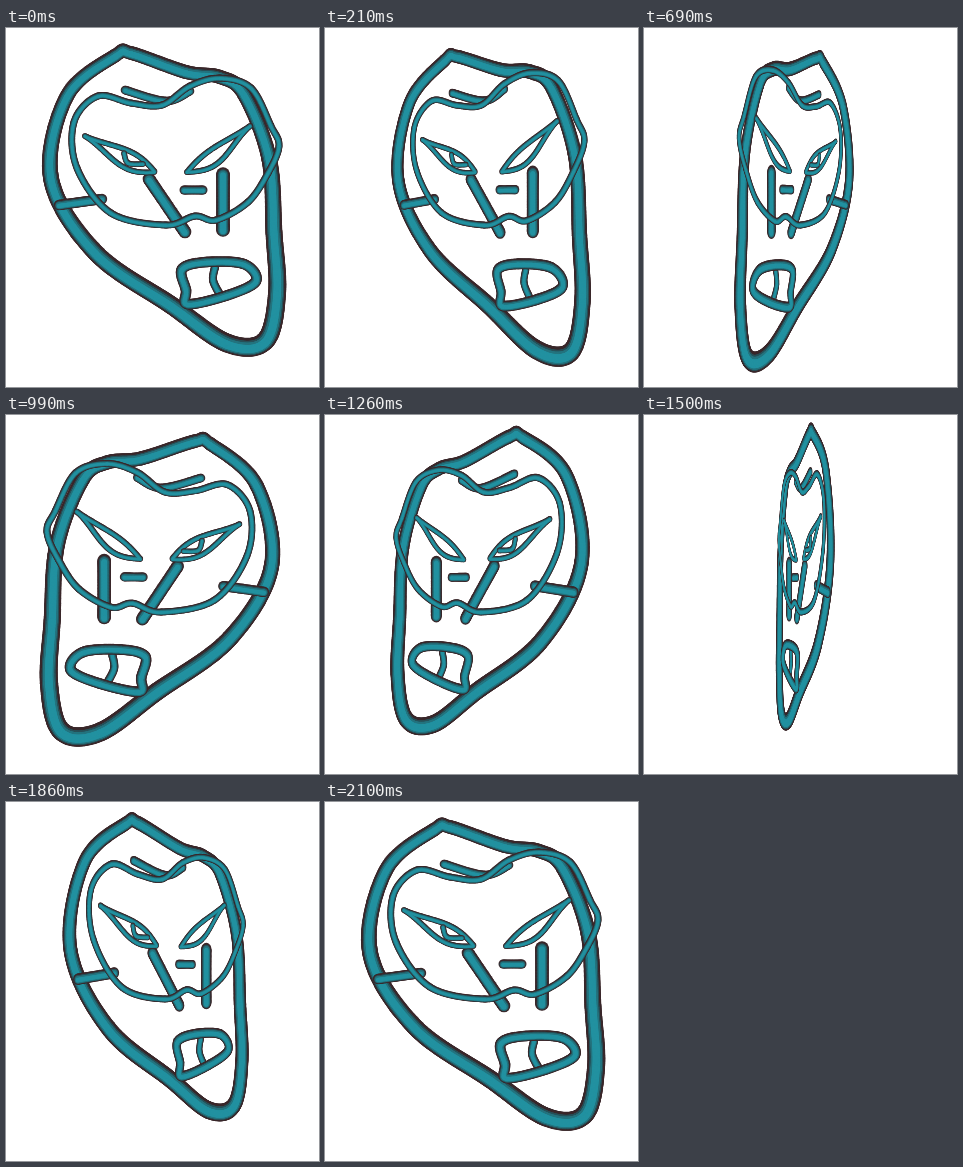
An HTML page with a canvas that plays this animation: 313 by 359 pixels, repeating every 2.16 s.

```html
<!DOCTYPE html>
<html lang="en">
<head>
<meta charset="utf-8">
<title>Turning mask</title>
<style>
  html, body { margin: 0; width: 313px; height: 359px; overflow: hidden; background: #fff; }
  canvas { display: block; }
</style>
</head>
<body>
<canvas id="stage" width="313" height="359"></canvas>
<script>
const ctx = document.getElementById('stage').getContext('2d');
const LOOP = 2160, STEP = 30, STEPS = 70;
const AXIS = 157.5, HORIZON = 175, CAMERA = 827;
const DEPTH = 0.36; // tube depth relative to its width
const CREST_DROP = 0.3; // the lit crest sits below the tube's middle

// Shading from rim to crest: colour and share of the tube radius
const SHADES = [['#3a282b', 1], ['#285058', 0.76], ['#24747f', 0.62], ['#2291a0', 0.42]];

const lerp = (a, b, u) => a + (b - a) * u;

// Catmull-Rom blend of four values
function spline(a, b, c, d, u) {
  const cubic = 3 * (b - c) + d - a;
  const square = 2 * a - 5 * b + 4 * c - d;
  return b + 0.5 * u * (c - a + u * (square + u * cubic));
}

// Smooth curve through key points, sampled about once per pixel
function curve(points, closed = false) {
  const n = points.length, samples = [];
  const at = i => points[closed ? (i + n) % n : Math.max(0, Math.min(n - 1, i))];
  for (let i = 0; i < (closed ? n : n - 1); i++) {
    const [a, b, c, d] = [at(i - 1), at(i), at(i + 1), at(i + 2)];
    const count = Math.ceil(Math.hypot(c[0] - b[0], c[1] - b[1]) / 1.2);
    for (let k = 0; k <= count; k++) {
      const u = k / count;
      samples.push([spline(a[0], b[0], c[0], d[0], u), spline(a[1], b[1], c[1], d[1], u)]);
    }
  }
  return samples;
}

// Eye outline between two corners, widest near the second one
function leaf([x1, y1], [x2, y2], above, below) {
  const length = Math.hypot(x2 - x1, y2 - y1), samples = [];
  const side = Math.sign(x2 - x1);
  for (const bulge of [-above * side, below * side]) {
    for (let k = 0; k <= length; k++) {
      const u = k / length;
      const off = bulge * Math.sin(Math.PI * u ** 1.5) / length;
      samples.push([lerp(x1, x2, u) - (y2 - y1) * off, lerp(y1, y2, u) + (x2 - x1) * off]);
    }
  }
  return samples;
}

const tube = (r, samples, taper = 0) => ({ r, samples, taper });

const head = curve([
  [110, 27], [125, 25], [180, 44], [214, 49], [238, 66], [263, 130], [268, 205],
  [271, 266], [259, 313], [221, 315], [165, 277], [89, 224], [45, 150], [61, 68]
], true);

const visor = curve([
  [156, 77], [184, 58], [214, 50], [245, 60], [265, 98], [273, 118], [262, 145],
  [242, 174], [210, 192], [189, 188], [160, 197], [105, 185], [71, 140], [68, 94], [92, 68], [125, 75]
], true);

const mouth = curve([
  [176, 241], [200, 234], [238, 236], [250, 253], [222, 267], [182, 276], [180, 262]
], true);

const tubes = [
  tube(8.2, head, 0.009),
  tube(5.2, curve([[53, 177], [96, 171]])),
  tube(4.3, curve([[119, 62], [160, 73], [184, 63]])),
  tube(6.3, curve([[143, 151], [179, 204]])),
  tube(6.8, curve([[217, 146], [217, 202]])),
  tube(4.5, curve([[178, 162], [197, 162]])),
  tube(3.4, visor),
  tube(2.8, leaf([79, 108], [149, 144], 7, 10)),
  tube(2.8, curve([[118, 125], [122, 135], [137, 136]])),
  tube(2.8, leaf([244, 98], [181, 144], 4, 11)),
  tube(4, curve([[209, 239], [207, 252], [213, 265]])),
  tube(5.3, mouth)
];

function draw(angle) {
  const cos = Math.cos(angle), sin = Math.sin(angle);
  const squeeze = Math.hypot(cos, DEPTH * sin);
  ctx.fillStyle = '#fff';
  ctx.fillRect(0, 0, 313, 359);
  for (const { r, samples, taper } of tubes) {
    for (const [colour, share] of SHADES) {
      ctx.fillStyle = colour;
      for (const [x, y] of samples) {
        const dx = x - AXIS, dy = y - HORIZON;
        const scale = CAMERA / (CAMERA - dx * sin);
        const full = (r + taper * dy) * scale;
        const radius = full * share;
        const drop = full * (1 - share) * CREST_DROP;
        ctx.beginPath();
        ctx.ellipse(AXIS + dx * cos * scale, HORIZON + dy * scale + drop,
          radius * squeeze, radius, 0, 0, 2 * Math.PI);
        ctx.fill();
      }
    }
  }
}

let shown = -1;
function tick() {
  const step = Math.min(STEPS, Math.floor(performance.now() % LOOP / STEP));
  if (step !== shown) {
    draw(2 * Math.PI * step / STEPS);
    shown = step;
  }
  requestAnimationFrame(tick);
}
tick();
</script>
</body>
</html>
```
